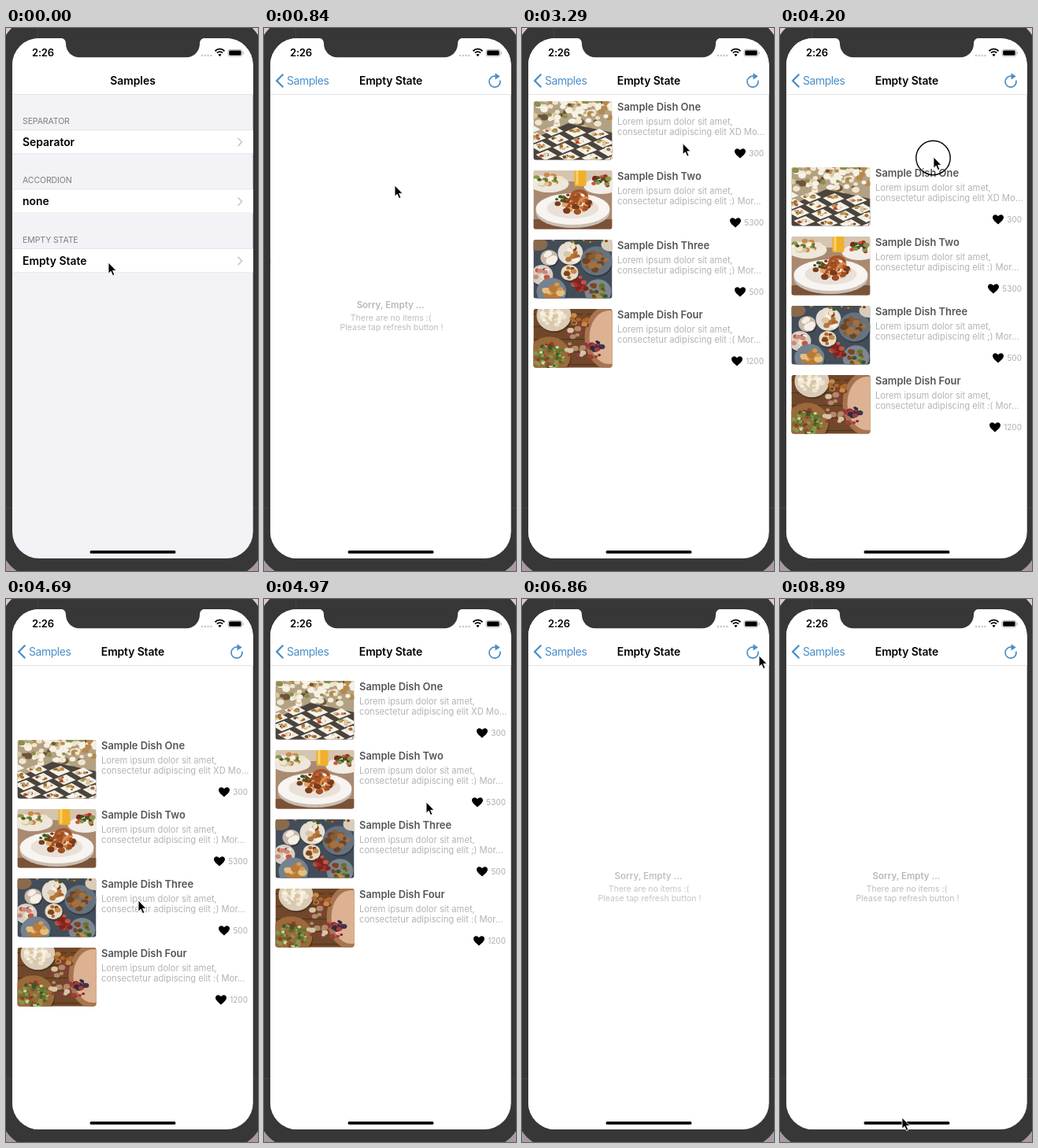
An HTML page for the animation above (8.96 s loop, 320 by 690 pixels).

```html
<!DOCTYPE html>
<html lang="en">
<head>
<meta charset="utf-8">
<title>Empty State</title>
<style>
html, body { margin: 0; width: 100%; height: 100%; overflow: hidden; background: #c9bac6; }
svg { display: block; font-family: Inter, Roboto, sans-serif; }
.bold { font-weight: 600; font-size: 13.9px; }
.time { font-weight: 600; font-size: 13px; letter-spacing: -.2px; }
.mid { text-anchor: middle; }
.head { font-size: 10.6px; letter-spacing: -.15px; fill: #7d7d82; }
.blue { fill: #4a8fc9; }
.hint { font-size: 10.5px; fill: #bdbdbd; }
.dish { font-weight: 600; font-size: 12.9px; fill: #555; }
.desc { font-size: 11.2px; fill: #b3b3b3; }
.count { font-size: 10px; fill: #adadad; text-anchor: end; }
</style>
</head>
<body>
<svg id="stage" width="320" height="690" viewBox="0 0 320 690"></svg>
<script>
const LOOP = 8960, STEP = 70;
const BEZEL = '#373737';

let seed = 7;
const rnd = () => (seed = (seed * 16807) % 2147483647) / 2147483647;

const text = (x, y, cls, s) => `<text x="${x}" y="${y}" class="${cls}">${s}</text>`;
const rect = (x, y, w, h, fill, r = 0) =>
  `<rect x="${x}" y="${y}" width="${w}" height="${h}" rx="${r}" fill="${fill}"/>`;
const oval = (x, y, rx, ry, fill) =>
  `<ellipse cx="${x}" cy="${y}" rx="${rx}" ry="${ry}" fill="${fill}"/>`;
const line = (d, color, w) =>
  `<path d="${d}" fill="none" stroke="${color}" stroke-width="${w}"/>`;
const shape = (d, fill) => `<path d="${d}" fill="${fill}"/>`;
const repeat = (n, fn) => Array.from({ length: n }, (_, i) => fn(i)).join('');

// Morsels strewn at random over an oval area
const strew = (n, x, y, rx, ry, size, colors) => repeat(n, () => {
  const a = rnd() * 6.283, d = Math.sqrt(rnd()), s = size * (.6 + rnd() * .7);
  return oval(x + rx * d * Math.cos(a), y + ry * d * Math.sin(a), s, s * .8,
    colors[Math.floor(rnd() * colors.length)]);
});
const plate = (x, y, r, rim, food, n, size) =>
  oval(x + 1, y + 2, r, r * .92, '#0004') + oval(x, y, r, r * .92, rim) +
  strew(n, x, y, r * .68, r * .62, size, food);

const greens = ['#61752f', '#88964a', '#3f5524'];
const browns = ['#a9682f', '#7c4420', '#c48a4a'];
const reds = ['#a8322b', '#c9533a', '#7d2420'];
const creams = ['#efe4cd', '#d9c6a2', '#f7f1e4'];

const buffet = () => rect(0, 0, 100, 75, '#b3a183') +
  strew(120, 50, 14, 56, 24, 4, [...creams, ...creams, '#b58a4e', '#8a8f4a', '#6e5538']) +
  shape('M0 48L44 28L100 40V75H0Z', '#4a443c') +
  repeat(16, i => {
    const row = Math.floor(i / 4), x = (i % 4) * 29 - 18 + row * 7, y = 32 + row * 11 + (i % 4) * 2;
    return shape(`M${x} ${y + 3}l15 -6 12 7 -15 6z`, '#f5f2ec') +
      strew(9, x + 13, y + 3, 7, 3, 2.2, [...browns, ...creams, i % 3 ? '#a9a04e' : '#b3452c']);
  });

const seafood = () => rect(0, 0, 100, 75, '#a98a70') +
  rect(0, 0, 100, 14, '#d5c4ae') + rect(0, 62, 100, 13, '#7a5238') +
  oval(20, 17, 25, 11, '#eee7dc') + strew(24, 18, 12, 18, 7, 3.5, [...greens, ...creams, '#c98a4a']) +
  oval(86, 20, 22, 10, '#f2ede6') + strew(16, 87, 14, 12, 7, 3, [...greens, ...reds]) +
  rect(52, 0, 15, 20, '#f0b02a', 2) + rect(54, 0, 3, 18, '#f9d36a') +
  oval(50, 53, 47, 20, '#c9bdb1') + oval(50, 49, 47, 20, '#f7f4f1') +
  oval(50, 48, 33, 13, '#e9e1d8') +
  strew(46, 51, 42, 21, 12, 3.6, ['#c97636', '#e0a35c', '#a44f22', '#d9b27a', '#7b3a1e']) +
  line('M48 38q0 -13 12 -12q10 2 7 14', '#a9532a', 4) + line('M57 44q3 -12 13 -9', '#db8d4d', 3) +
  strew(6, 36, 36, 8, 5, 2.5, greens);

const mezze = () => rect(0, 0, 100, 75, '#434d59') +
  plate(20, 23, 11, '#c9b9ac', ['#f6efe6'], 8, 5) +
  plate(47, 17, 16, '#e5ded3', [...browns, '#b5763a', ...creams], 20, 4) +
  plate(80, 27, 20, '#66727f', ['#8a5a33', '#6d4526', '#a3713f'], 20, 4.2) +
  plate(11, 45, 14, '#d5cec6', [...reds, '#c98a7a', ...creams], 18, 3) +
  plate(23, 66, 19, '#75828f', ['#d39a52', '#e5bd7e', '#b87a38'], 14, 5) +
  plate(82, 66, 17, '#7d8791', [...greens, ...browns], 18, 3) +
  plate(46, 42, 11, '#e9dcc5', browns, 9, 3) +
  strew(22, 60, 56, 10, 9, 3, reds) + oval(6, 6, 12, 8, '#8a6a4c') +
  oval(98, 6, 12, 9, '#d9cdba') + strew(14, 60, 2, 40, 4, 2, [...greens, ...browns]);

const harvest = () => rect(0, 0, 100, 75, '#70472a') +
  repeat(5, i => rect(0, i * 16 + 6, 100, 1.2, '#553419')) +
  plate(26, 8, 22, '#d9cbb5', creams, 50, 3) +
  plate(20, 60, 27, '#9a6a3a', [...greens, ...greens, '#d9d3a2', '#a8322b'], 80, 2.6) +
  oval(94, 36, 29, 40, '#a8744f') + oval(96, 36, 25, 34, '#dcb292') +
  strew(22, 54, 44, 12, 28, 3.8, ['#d8c3a8', '#8d3b3b', '#b28a69', '#53313a']) +
  strew(24, 78, 52, 10, 11, 3, ['#7d2430', '#2f2b40', '#a83a38', '#3c3650']) +
  strew(14, 62, 14, 14, 9, 3, browns);

const dishes = [
  ['One', 'XD Mo…', 300, 277, buffet],
  ['Two', ':) Mor…', 5300, 271, seafood],
  ['Three', ';) Mor…', 500, 277, mezze],
  ['Four', ':( Mor…', 1200, 273, harvest],
];

const heart = 'M0 6.5C-4 3 -7 .5 -7 -2.3C-7 -6.5 -2 -7 0 -3.7C2 -7 7 -6.5 7 -2.3C7 .5 4 3 0 6.5Z';

const dishRow = ([name, tail, likes, hx, photo], i) => `<g transform="translate(0 ${93 + i * 88})">
  <g transform="translate(14.5 0)" clip-path="url(#photo)">${photo()}</g>
  ${text(121, 12.3, 'dish', 'Sample Dish ' + name)}
  ${text(121, 29.5, 'desc', 'Lorem ipsum dolor sit amet,')}
  ${text(121, 43, 'desc', 'consectetur adipiscing elit ' + tail)}
  <g transform="translate(${hx} 66)">${shape(heart, '#000')}</g>
  ${text(307, 70, 'count', likes)}</g>`;

const menuRow = ([head, label], i) => {
  const y = 129.5 + i * 75.5;
  return text(21, y - 7.7, 'head', head) +
    `<rect id="row${i}" x="8" y="${y}" width="306" height="30" fill="#fff"/>` +
    rect(8, y - .5, 306, .7, '#dedde2') + rect(8, y + 29.5, 306, .7, '#e4e3e8') +
    text(21, y + 20.2, 'bold', label) +
    line(`M294.5 ${y + 10.3}l5 5.2 -5 5.2`, '#c4c4c8', 1.5);
};

const arc = r => `M${271.5 - r * .75} ${35.3 - r * .75}A${r} ${r} 0 0 1 ${271.5 + r * .75} ${35.3 - r * .75}`;

document.getElementById('stage').innerHTML = `
<defs>
  <clipPath id="screen"><rect x="8" y="13" width="305.7" height="661" rx="34"/></clipPath>
  <clipPath id="photo"><rect width="100" height="74.5" rx="3"/></clipPath>
  <linearGradient id="desk" x2="0" y2="1">
    <stop stop-color="#dcc6d6"/><stop offset="1" stop-color="#a899a4"/>
  </linearGradient>
</defs>
${rect(0, 0, 320, 690, 'url(#desk)')}
${rect(-7, -12, 334, 709, BEZEL, 45)}
${rect(40, 0, .7, 13, '#4a4a4a')}${rect(0, 609, 320, .7, '#4a4a4a')}
<g clip-path="url(#screen)">
  <g id="menu">
    ${rect(8, 13, 306, 661, '#f3f2f7')}
    ${[['SEPARATOR', 'Separator'], ['ACCORDION', 'none'], ['EMPTY STATE', 'Empty State']].map(menuRow).join('')}
  </g>
  <g id="page">
    ${rect(8, 13, 306, 661, '#fff')}
    <g id="hint">
      <text x="160.5" y="355.5" class="mid" font-size="11.5" font-weight="600" fill="#b8b8b8">Sorry, Empty ...</text>
      ${text(161, 372, 'hint mid', 'There are no items :(')}
      ${text(162, 384.3, 'hint mid', 'Please tap refresh button !')}
    </g>
    <g id="list">${dishes.map(dishRow).join('')}</g>
  </g>
  ${rect(8, 13, 306, 71.5, '#fff')}${rect(8, 84, 306, .8, '#dcdcde')}
  <g id="oldTitle">${text(161, 71.7, 'bold mid', 'Samples')}</g>
  <g id="newTitle" letter-spacing="-.1">${text(161, 71.7, 'bold mid', 'Empty State')}</g>
  <g id="buttons">
    ${line('M24.3 58.8L16.2 67L24.3 75.2', '#4a8fc9', 2.3)}
    <text x="29" y="71.7" class="blue" font-size="13.9" letter-spacing="-.4">Samples</text>
    ${line('M294 61.2A7 7 0 1 0 299.8 66.5', '#4a8fc9', 1.7)}
    ${shape('M293.5 57.3L299.8 61.6L293.5 65.4Z', '#4a8fc9')}
  </g>
  ${text(33, 36.3, 'time', '2:26')}
  ${repeat(4, i => oval(249 + i * 3.8, 35, 1.2, 1.2, '#c4c4c6'))}
  ${line(arc(8), '#000', 1.9)}${line(arc(4.8), '#000', 1.8)}${shape('M269.4 33.8Q271.5 32 273.6 33.8L271.5 36.2Z', '#000')}
  <rect x="282" y="27.4" width="17.8" height="8.6" rx="2.4" fill="none" stroke="#aaa" stroke-width=".8"/>
  ${rect(283.2, 28.6, 15.4, 6.2, '#000', 1.4)}${rect(300.6, 30.2, 1.1, 3, '#aaa', .5)}
  ${rect(106.5, 664, 109, 3.8, '#000', 1.9)}
</g>
${shape('M69 12.5Q76 13 76 20A17 17 0 0 0 93 37.3H229A17 17 0 0 0 246 20Q246 13 253 12.5Z', BEZEL)}
<g id="cursor">
  <circle id="touch" r="21.7" cx="-.5" cy="1" fill="none" stroke="#000" stroke-width="1.4"/>
  <path d="M0 0V14.2L3.2 11.2L5.5 16.6L7.9 15.6L5.6 10.3H10Z" stroke="#fff" stroke-width=".9"/>
</g>`;

const $ = id => document.getElementById(id);
const clamp = v => Math.min(1, Math.max(0, v));
const ramp = (t, from, to) => clamp((t - from) / (to - from));
const smooth = k => k * k * (3 - 2 * k);

// Each key is [time, ...values]
const track = (keys, t, ease = k => k) => {
  const i = keys.findIndex(k => k[0] > t);
  if (i < 1) return keys[i < 0 ? keys.length - 1 : 0].slice(1);
  const a = keys[i - 1], b = keys[i], k = ease((t - a[0]) / (b[0] - a[0]));
  return a.slice(1).map((v, n) => v + (b[n + 1] - v) * k);
};

const pointer = [
  [0, 130, 298], [210, 130, 298], [280, 130, 299], [420, 130, 299],
  [1260, 202, 101], [1540, 227, 101], [2170, 290, 66], [2380, 297, 69], [2800, 297, 69],
  [3360, 200, 150], [3430, 200, 152], [3950, 182, 365], [4020, 182, 365], [4200, 195, 164],
  [4620, 168, 383], [4690, 168, 383], [5250, 244, 133], [5740, 296, 67], [6440, 299, 65],
  [6860, 301, 72], [7280, 108, 474], [7420, 108, 474], [7630, 85, 330], [7840, 160, 232],
  [8010, 224, 300], [8190, 172, 405], [8470, 172, 405], [8890, 155, 659],
];
const pull = [
  [3430, 0], [3950, 108], [4020, 108], [4200, 84], [4480, 104], [4620, 106],
  [4690, 86], [4760, 56], [4830, 34], [4900, 18], [5040, 4], [5180, 0],
];

const move = (id, x, y) => $(id).setAttribute('transform', `translate(${x} ${y})`);
const fade = (id, v) => $(id).setAttribute('opacity', v);

function draw(t) {
  const push = 1 - (1 - ramp(t, 420, 910)) ** 4;
  move('menu', -92 * push, 0);
  move('page', 306 * (1 - push), 0);
  $('row2').setAttribute('fill', t >= 420 ? '#d9d9dc' : '#fff');
  move('oldTitle', -105 * push, 0);
  fade('oldTitle', clamp(1 - push * 1.4));
  move('newTitle', 120 * (1 - push), 0);
  fade('newTitle', push);
  fade('buttons', push);

  const loaded = ramp(t, 2800, 3150);
  fade('list', loaded * (1 - ramp(t, 6020, 6370)));
  fade('hint', 1 - loaded + ramp(t, 6370, 6930));
  move('list', 0, track(pull, t)[0]);

  move('cursor', ...track(pointer, t, smooth));
  fade('touch', (t >= 3430 && t < 4020) || (t >= 4200 && t < 4620) ? 1 : 0);
}

const start = performance.now();
function frame() {
  const t = (performance.now() - start) % LOOP;
  draw(Math.floor(t / STEP) * STEP);
  requestAnimationFrame(frame);
}
frame();
</script>
</body>
</html>
```
